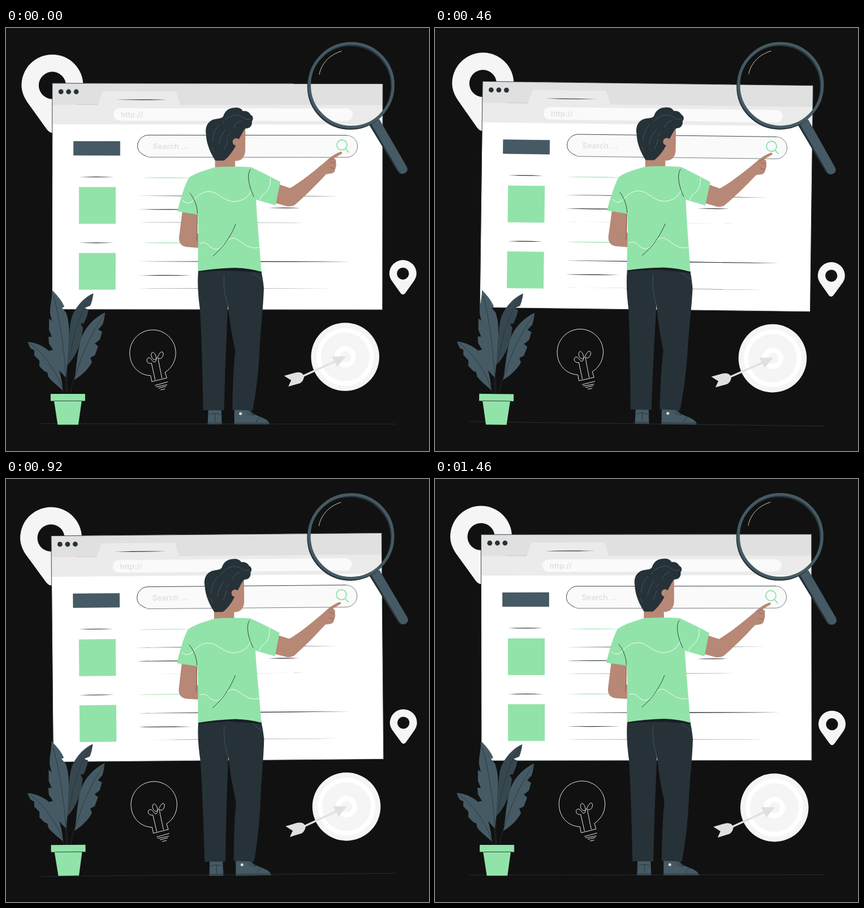
These frames come from a looping animation (748 px wide and 748 px high, 1.5 s). An HTML page:

```html
<!DOCTYPE html>
<html lang="en">
<head>
<meta charset="utf-8">
<title>Search page</title>
<style>
html, body { margin: 0; width: 100%; height: 100%; overflow: hidden; background: #111; }
svg { display: block; width: 100vw; height: 100vh; }
text { font-family: Inter, sans-serif; font-weight: 600; fill: #e0e0e0; }
.dark { fill: #263238; }
.slate { fill: #455a64; }
.green { fill: #92e3a9; }
.skin { fill: #b78876; }
.pale { fill: #f5f5f5; }
.line { fill: none; stroke-width: .9; stroke-linecap: round; stroke-linejoin: round; }
.ink { stroke: #263238; }
.rib { stroke: #263238; stroke-width: .8; }
.white { stroke: #fff; }
</style>
</head>
<body>
<svg viewBox="0 0 748 748">
  <defs>
    <g id="pin">
      <path class="pale" d="M0-24A24 24 0 0 1 24 0C24 5.6 21.5 10.5 18.5 14.5L4 34.6Q0 39.4-4 34.6L-18.5 14.5C-21.5 10.5-24 5.6-24 0A24 24 0 0 1 0-24Z"/>
      <circle r="10.6" fill="#111"/>
    </g>
  </defs>

  <g data-pivot="374 700">
    <path class="line ink" d="M62 700H688" stroke-width=".8"/>
  </g>

  <g data-pivot="377 344">
    <use href="#pin" transform="translate(81.7 101.7) scale(2.27)"/>
    <use href="#pin" transform="translate(702 434)"/>
    <g transform="translate(600 581.3)">
      <circle class="pale" r="60.3"/>
      <circle r="51" fill="#fff"/>
      <circle class="pale" r="43"/>
      <circle r="19" fill="#fff"/>
      <circle class="pale" r="10"/>
    </g>
    <g fill="#e0e0e0">
      <path d="M523 614.5L582 587.5L583.5 590.5L524.5 617.5Z"/>
      <path d="M601 580.5L576.5 580.5L586 598.5Z"/>
      <path d="M492 615L512 609.3Q524 606.5 527.5 616Q526 625 520 628L499.500 634L504.500 623Z"/>
    </g>
    <g class="line white">
      <path d="M258 625L256 614.800C234 614 219 596 219 575A40.700 40.700 0 1 1 281.500 609L284.500 618.500Z"/>
      <path d="M264 622L257.500 593C249 595 247 585 252 583.500C258 582 259 593 264 590.500C269 585 263 571 258.500 574C254 579 261 592 267 584C271 578 272 572 277 573C281 577 275 588 270 584C268 580 270 590 276 619"/>
      <path d="M264 632L286 626M266 634.500L285 631M270 637L283 634M274 640L281 638.500"/>
    </g>
  </g>

  <g data-pivot="374 298">
    <rect x="82" y="98" width="584" height="400" fill="#fff"/>
    <path fill="#ebebeb" d="M82 135H666V170.500H82Z"/>
    <path fill="#e0e0e0" d="M82 98H666V136H82Z"/>
    <path fill="#ebebeb" d="M162 136.500L170 114Q170.800 112 173 112H298Q300 112 300.800 114L308 136.500Z"/>
    <path class="line" stroke="#c8c8c8" stroke-width=".6" d="M126 135.500H162"/>
    <rect class="line ink" x="82" y="98" width="584" height="400" stroke-width=".8"/>
    <g class="dark">
      <circle cx="97" cy="113" r="4.400"/><circle cx="110.500" cy="113" r="4.400"/><circle cx="124" cy="113" r="4.400"/>
    </g>
    <rect x="190" y="142" width="423" height="22" rx="11" fill="#fafafa"/>
    <text x="203" y="158" font-size="13">http://</text>
    <rect x="232.500" y="189.500" width="389" height="39" rx="19.500" fill="#fafafa"/>
    <path class="line ink" d="M246 226C235 221 232.500 215 232.500 209A19.500 19.500 0 0 1 252 189.500H602"/>
    <path class="line ink" stroke-width=".45" opacity=".7" d="M602 189.500A19.500 19.500 0 0 1 602 228.500H252L246 226"/>
    <text x="259.500" y="214" font-size="13.600">Search ...</text>
    <g fill="none" stroke="#92e3a9" stroke-width="1.900" stroke-linecap="round">
      <circle cx="594" cy="206.500" r="9"/><path d="M600.500 213.500L606 219.500"/>
    </g>
    <rect class="slate" x="119.500" y="200.700" width="82" height="24.600" stroke="#263238" stroke-width=".5"/>
    <path class="green" d="M129 281.500h65v65h-65ZM129 398h65v65h-65Z"/>
    <g id="rules"></g>
  </g>

  <g data-pivot="107 583">
    <path class="line rib" d="M105 610L106 648M121 618Q115 634 114 648M98 636L103 648M109 592Q106 620 109 648"/>
    <path fill="#37474f" d="M154.500 469C138 476 122 494 116 512C110 535 113 562 106 598C120 587 130 565 134 545L136 530L132 523L138 522L143 510L146 498L139 495L149 491Q153 482 154.500 469Z"/>
    <path class="line rib" d="M153 472C132 500 122 530 112 585"/>
    <path class="slate" d="M81.500 463.500C91 473 100 484 103 493L99 495L106 503C111 516 113 535 110.500 562C109 588 108 600 106 618C95 607 83 594 79 577L75.500 571L83 569L76 558L75 546L81 546L76 534L76 514L81 518L78 505C77 491 82 478 81.500 463.500Z"/>
    <path class="line rib" d="M84 474C94 510 102 560 105.500 612"/>
    <path class="slate" d="M175 503C156 512 139 530 133 549C126 570 125 600 121 622C133 615 145 604 152 591L149 583L157 579L163 563L157 558L166 551L170 537L163 533L171 524Q174 515 175 503Z"/>
    <path class="line rib" d="M173 508C150 540 135 575 122 617"/>
    <path class="slate" d="M38.500 555C52 556 69 563 78 573C90 587 99 615 100.500 641C91 632 82 626 75 617L73 609L68 607L59 598L59 588L50 579L50 570L44 567Q40 561 38.500 555Z"/>
    <path class="line rib" d="M43 558C68 577 87 604 99 635"/>
    <path class="green" d="M79 647H140V659.500H79ZM85 659H134L128 701.500H91.500Z"/>
    <path class="line ink" d="M86 659.500H135"/>
  </g>

  <g data-pivot="450 421">
    <path class="slate" d="M358 674H381L382 701H357ZM404 674H431L435 681C446 687 463 690 466 699V701H404Z"/>
    <path fill="#37474f" d="M357 697.500H382V701H357ZM404 697.500H465L466 701H404Z"/>
    <path class="line ink" d="M359 684Q369 679 380 684M370 682V696M425 679L432 685M430 677Q439 680 437 684Q433 684 430 678M436 686L441 683M450 688Q443 692 443 697"/>
    <circle cx="415" cy="682" r="2.500" fill="#e0e0e0"/>
    <path class="dark" d="M340 429C338 452 340 475 343 497C346 545 348 620 349 676H386C387 615 390 545 392.500 490C396 525 401 550 405.500 570C402 605 401 640 400.500 675L436.500 676.500C443 640 447 605 448.500 572C450 535 455 495 456 460Q454 440 451 429Z"/>
    <path fill="#182023" d="M340 432V426Q395 418 451 427L452 433.500Q395 426 340 432Z"/>
    <path class="line" stroke="#455a64" d="M386 437C384.500 455 386 470 392 490M437 432Q444 441 454 445"/>

    <path class="skin" d="M312 322L338.500 328V363L343.500 366L342.500 389L321 387.500C311 387 305 381 306 370Z"/>
    <path class="line" stroke="#7d5548" d="M338 331Q338 355 337 376"/>
    <path class="skin" d="M478 275L502 283C522 272 546 252 566 235C573 228 584 221 592 218.700Q596 219.500 593 222.500L579.500 230.500Q585 232 583 238Q585 244 582 248Q582 257 573 257.500L566 258.500C549 277 530 296 511 312.500Q506 316 498 315.500L474 309Z"/>
    <path class="line" stroke="#8d6253" stroke-width=".7" d="M579 230.500Q572 232 571 235M583 238Q579 240 574 237M582 248Q577 249 573 246"/>
    <path class="skin" d="M369.500 222H405V248H369.500ZM398 180L418 172L423 175V214Q423 234 407 235L390 236Z"/>
    <path class="dark" d="M353.500 188C351 172 359 163 370 161C376 160 382 160 384 156C387 146 395 141 404 141C411 140 417 143 418.500 147C425 146 430 149 432 153C437 156 438 161 434.500 165C436 172 431 178 424 177.500C420 179 416 190 412 196L406 208C401 218 394 228 385 234.500H370C363 224 354 206 353.500 188Z"/>
    <circle class="skin" cx="407" cy="201.500" r="6.500"/>
    <path class="line" stroke="#455a64" stroke-width=".8" d="M382 168C391 155 407 151 417 157Q424 164 433 161M365 201C365 188 370 178 377 172M376 206Q379 190 388 180M386 214Q390 206 392 197M391 192L396 186M364 211L367 218M402 177Q408 164 416 165"/>

    <path class="green" d="M370 246C355 251 335 256 323 265C314 282 308 305 303 324.500L339 330C341 355 339 390 339.500 430Q370 425 405 424Q432 425 451.500 431C449 390 444 345 442 303.500L476.500 313.500L485 272C468 263 450 254 433 246Q402 244 370 246Z"/>
    <g class="line white">
      <path d="M312 305Q320 314 330 306C345 289 356 287 368 291C381 297 389 307 404 307C420 306 430 298 434 286"/>
      <path d="M467 265C469 279 463 289 454 295Q450 299 449 304"/>
      <path d="M343 381Q352 377 359 385C366 392 375 394 382 386C390 376 397 370 404 372C417 376 426 393 448 388"/>
    </g>
    <path class="line ink" d="M406 347C397 370 383 389 366 403.500M432 250C426 258 428 277 438 298M325 292C333 302 338 314 338.500 328"/>
  </g>

  <g data-pivot="621 141">
    <path class="dark" d="M642 171L657 161L704 244Q711 254 703 257.500Q697 260 692 253Z"/>
    <path class="slate" d="M646 170L660 161L708 244Q713 252 706 256.500Q699 260 694.500 253Z"/>
    <circle cx="609" cy="103.500" r="73.800" fill="none" stroke="#263238" stroke-width="5"/>
    <circle cx="610.500" cy="101.300" r="74" fill="none" stroke="#455a64" stroke-width="5"/>
    <path class="line" stroke="#e8e2c8" d="M554 82C557 65 570 48 593 41"/>
  </g>
</svg>
<script>
const LOOP = 1500, FRAMES = 36;
const INK = '#263238', GREEN = '#92e3a9';

// Horizontal strokes that taper to a point at both ends: x1, x2, y, thickness, colour.
const rules = [
  [194, 284, 127, 1.3, INK],
  [129, 191, 263.5, 1.3, INK],
  [129, 191, 380, 1.3, INK],
  [233, 335, 265, 1.2, GREEN],
  [229, 588, 297, 1.3, INK],
  [232, 350, 321, 1.4, INK],
  [463, 520, 318, 1.3, INK],
  [235, 528, 344, .5, INK],
  [233, 335, 380, 1.2, GREEN],
  [231, 610, 413, 1.5, INK],
  [233, 328, 437.5, 1.3, INK],
  [235, 585, 460.5, .5, INK]
];
document.getElementById('rules').innerHTML = rules.map(([a, b, y, w, fill]) => {
  const mid = (a + b) / 2;
  return `<path fill="${fill}" d="M${a} ${y}Q${mid} ${y - w} ${b} ${y}Q${mid} ${y + w} ${a} ${y}Z"/>`;
}).join('');

const parts = [...document.querySelectorAll('[data-pivot]')];

// Triangle wave in degrees: 0, 1, 0, -1, 0.
function sway(p) {
  if (p < .25) return p * 4;
  return p < .75 ? 2 - p * 4 : p * 4 - 4;
}

function draw(ms) {
  const step = Math.floor((ms % LOOP + 5) * FRAMES / LOOP) % FRAMES;
  const angle = sway((step + .5) / FRAMES);
  for (const part of parts) {
    part.setAttribute('transform', `rotate(${angle} ${part.dataset.pivot})`);
  }
}

let start;
function tick(now) {
  start ??= now;
  draw(now - start);
  requestAnimationFrame(tick);
}
draw(0);
requestAnimationFrame(tick);
</script>
</body>
</html>
```
